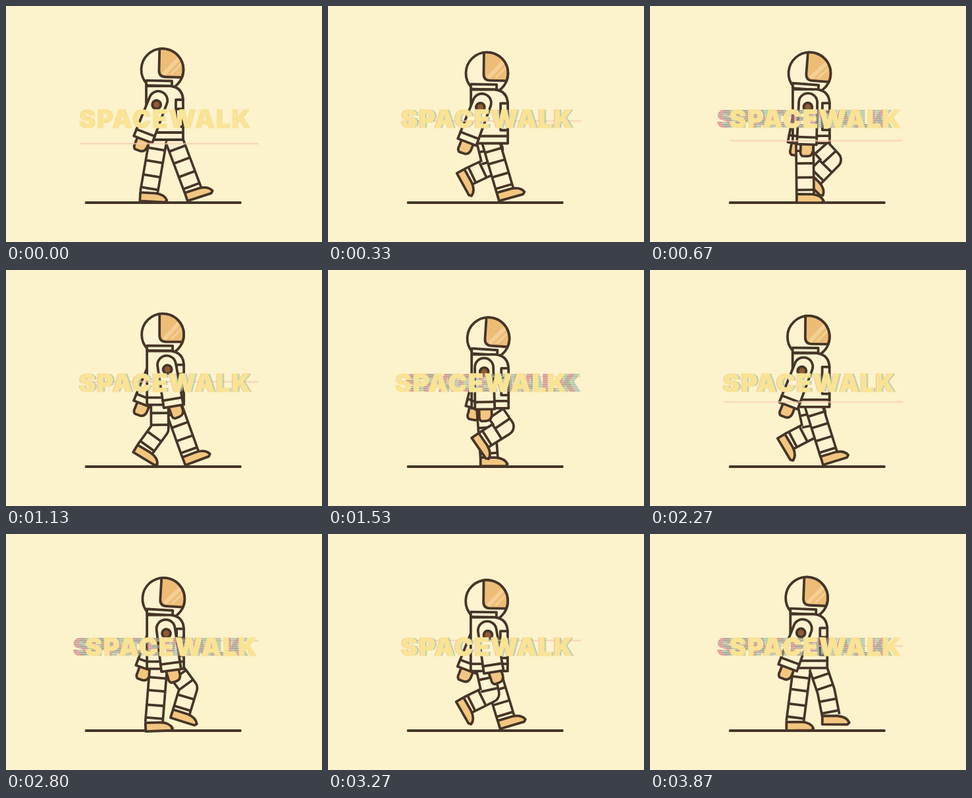
Recreate the animation shown at these times as an HTML page. Size 480 by 360 pixels, loop 3.94 s.

```html
<!DOCTYPE html>
<html lang="en">
<head>
<meta charset="utf-8">
<title>Spacewalk</title>
<style>
  html, body { margin: 0; width: 100%; height: 100%; overflow: hidden; background: #fcf2cc; }
  svg { display: block; width: 100vw; height: 100vh; }
  .ink { stroke: #463528; stroke-width: 3.8; stroke-linejoin: round; stroke-linecap: round; }
  .suit { fill: #fdf3d1; }
  .visor { fill: #edbd76; }
  .gold { fill: #f2c680; }
  .none { fill: none; }
  .limb { fill: none; stroke-linejoin: round; }
  .word { font: 900 38px Inter, "Open Sans", sans-serif; letter-spacing: 1.9px; text-anchor: middle; }
</style>
</head>
<body>
<svg viewBox="0 0 480 360">
  <defs>
    <clipPath id="screen"><rect x="97" y="145" width="287" height="75"/></clipPath>
    <pattern id="scan" width="4" height="3" patternUnits="userSpaceOnUse">
      <rect width="4" height="2" fill="#fff"/><rect y="2" width="4" height="1" fill="#777"/>
    </pattern>
    <mask id="rows" maskUnits="userSpaceOnUse" x="90" y="145" width="300" height="75">
      <rect x="90" y="145" width="300" height="75" fill="url(#scan)"/>
    </mask>
    <g id="leg">
      <path class="limb tube" stroke="#463528" stroke-width="30"/>
      <path class="limb tube" stroke="#fdf3d1" stroke-width="22.6"/>
      <path class="ink none stripes"/>
      <path class="ink gold foot" d="M-13 0H10Q24 1 28 10L25 13H-13Z"/>
    </g>
    <g id="arm">
      <path class="ink gold hand" d="M-9 55H10V66Q9 75 1 75H-6Q-10 73 -9 66Z"/>
      <path class="ink suit" d="M-15 57L-14 -7A14 14 0 0 1 14 -7L15 57Z"/>
      <path class="ink none" d="M-15 46H15"/>
      <circle class="ink" r="6.5" fill="#8f5c34"/>
    </g>
  </defs>

  <path class="ink" d="M121.5 300H356"/>
  <g id="farArm"></g>
  <g id="farLeg"></g>
  <g id="nearLeg"></g>
  <g id="body">
    <g id="head">
      <circle class="ink suit" cx="237" cy="97" r="32"/>
      <path class="visor" d="M232 65.4V98Q232 108 242 108H267A32 32 0 0 0 232 65.4Z"/>
      <path d="M239 104L262 79" stroke="#f4cf96" stroke-width="6"/>
      <path d="M250 104L266 87" stroke="#f4cf96" stroke-width="3"/>
      <path class="ink none" d="M232 65.4V98Q232 108 242 108H267A32 32 0 0 0 232 65.4Z"/>
      <path class="ink suit" d="M213 114H252V121.5H213Z"/>
    </g>
    <path class="ink suit" d="M213 122H249Q269 124 269 145V204H213Z"/>
    <path class="ink none" d="M213 193H269M269 143H258V184H269M258 157H269"/>
  </g>
  <g id="nearArm"></g>

  <g clip-path="url(#screen)">
    <path id="beam" d="M112 0H400" stroke="#f9cdb0" stroke-width="2.4" opacity=".7"/>
    <g mask="url(#rows)">
      <text class="word" id="rose" y="186" fill="#c77684" opacity=".72">SPACEWALK</text>
      <text class="word" id="teal" y="186" fill="#86ae96" opacity=".6">SPACEWALK</text>
    </g>
    <text class="word" id="title" y="186" fill="#f9e395" stroke="#f9e395">SPACEWALK</text>
  </g>
</svg>
<script>
const LOOP = 3940, FRAMES = 59, STRIDE = FRAMES / 2, STEP = STRIDE / 2;
const BONE = 38.5;       // length of thigh and of shin
const BURST = 16;        // frames between glitch bursts
const $ = id => document.getElementById(id);
const mod = (a, n) => ((a % n) + n) % n;
const wave = (phase, peak, period = STRIDE) => Math.cos((phase - peak) / period * 2 * Math.PI);
const random = seed => mod(Math.sin(seed * 12.99) * 437.58, 1);

// Key poses of one stride: heel strike, roll, flat, push-off, lift, pass, reach
const GAIT = [
  { at: 0, x: 284, y: 281, turn: -18 },
  { at: 4.6, x: 271, y: 281, turn: -17 },
  { at: 8.2, x: 245, y: 286, turn: 0 },
  { at: STEP, x: 217, y: 285, turn: 3 },
  { at: 19.4, x: 212, y: 261, turn: 60 },
  { at: 24.75, x: 250, y: 262, turn: 45 },
  { at: 28.4, x: 274, y: 277, turn: 2 }
];

// Smooth cyclic curve through the key poses
function ankleAt(phase) {
  const p = mod(phase, STRIDE), n = GAIT.length;
  const key = i => ({ ...GAIT[mod(i, n)], at: GAIT[mod(i, n)].at + Math.floor(i / n) * STRIDE });
  let i = n - 1;
  while (GAIT[i].at > p) i--;
  const [a, b, c, d] = [-1, 0, 1, 2].map(k => key(i + k));
  const span = c.at - b.at, u = (p - b.at) / span;
  return ["x", "y", "turn"].map(v => {
    const m0 = (c[v] - a[v]) / (c.at - a.at) * span;
    const m1 = (d[v] - b[v]) / (d.at - b.at) * span;
    const delta = c[v] - b[v];
    return b[v] + u * (m0 + u * (3 * delta - 2 * m0 - m1 + u * (m0 + m1 - 2 * delta)));
  });
}

// The knee bends forward whenever hip and ankle come close
function kneeBetween([hx, hy], [ax, ay]) {
  const dx = ax - hx, dy = ay - hy, d = Math.hypot(dx, dy);
  const bend = Math.sqrt(Math.max(0, BONE ** 2 - d * d / 4));
  return [(hx + ax) / 2 + dy / d * bend, (hy + ay) / 2 - dx / d * bend];
}

function stripe([x0, y0], [x1, y1], u) {
  const len = Math.hypot(x1 - x0, y1 - y0);
  const nx = (y0 - y1) / len * 12, ny = (x1 - x0) / len * 12;
  const x = x0 + (x1 - x0) * u, y = y0 + (y1 - y0) * u;
  return `M${x - nx} ${y - ny}L${x + nx} ${y + ny}`;
}

function drawLeg(g, phase, dip) {
  const [x, y, turn] = ankleAt(phase);
  const ankle = [x, y];
  const hip = [243 + 12 * wave(phase, -.8), 203 + dip * .6];
  const knee = kneeBetween(hip, ankle);
  for (const tube of g.querySelectorAll(".tube")) tube.setAttribute("d", `M${hip}L${knee}L${ankle}`);
  g.querySelector(".stripes").setAttribute("d",
    [.37, .84].map(u => stripe(hip, knee, u) + stripe(knee, ankle, u)).join(""));
  g.querySelector(".foot").setAttribute("transform", `translate(${ankle}) rotate(${turn})`);
}

function drawArm(g, phase, dip) {
  const angle = 6 + 16 * Math.tanh(2 * wave(phase, 2));
  const x = 237 - 8.5 * wave(phase, 1);
  g.setAttribute("transform", `translate(${x} ${150.5 + dip * .7}) rotate(${angle})`);
  g.querySelector(".hand").setAttribute("transform", `rotate(${Math.min(0, angle) * 1.2} 0 50)`);
}

function drawTitle(frame) {
  const beat = frame % BURST;
  const bursting = beat > 5 && beat < 13;
  const shift = bursting ? 10 * Math.sin(beat - 8.2) : 0;
  const spread = frame === 0 ? 0 : bursting ? 4 : 2;
  const place = (id, x) => $(id).setAttribute("x", 242 + x);
  place("title", shift);
  place("rose", spread / 2 - shift * .8 - spread);
  place("teal", spread / 2 - shift * .8 + spread);
  $("beam").setAttribute("transform", `translate(${shift} ${210 - 53 * random(frame)})`);
}

function draw(ms) {
  const frame = Math.floor(ms / LOOP * FRAMES + .1) % FRAMES;
  const dip = 3.6 - 3.6 * wave(frame, 0, STEP);
  const tilt = 2.2 - 2.2 * wave(frame, 2.8, STEP);
  for (const [side, phase] of [["near", frame], ["far", frame + STEP]]) {
    drawLeg($(side + "Leg"), phase, dip);
    drawArm($(side + "Arm"), phase, dip);
  }
  $("body").setAttribute("transform", `translate(${dip * .75} ${dip})`);
  $("head").setAttribute("transform", `rotate(${tilt} 232 118)`);
  drawTitle(frame);
}

for (const side of ["near", "far"])
  for (const part of ["Leg", "Arm"])
    $(side + part).append(...$(part.toLowerCase()).cloneNode(true).children);

const start = performance.now();
function tick() {
  draw((performance.now() - start) % LOOP);
  requestAnimationFrame(tick);
}
tick();
</script>
</body>
</html>
```
